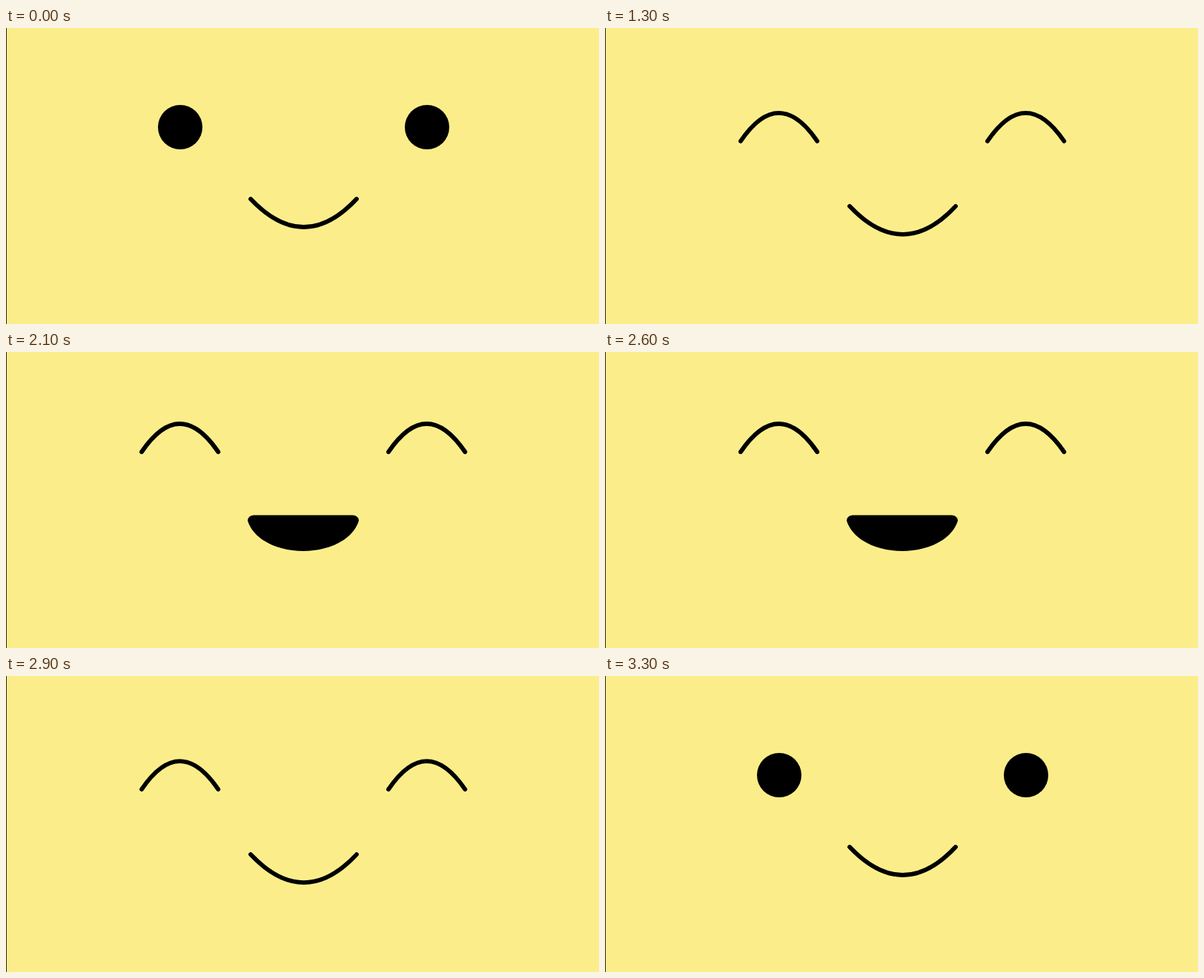
An HTML page that plays this animation: 800 by 400 pixels, repeating every 3400 ms.

```html
<!DOCTYPE html>
<html lang="en">
<head>
<meta charset="utf-8">
<title>Smiley</title>
<style>
  html, body { margin: 0; height: 100%; overflow: hidden; background: #fbee8a; }
  svg { display: block; }
  .line { fill: none; stroke: #000; stroke-width: 5.8; stroke-linecap: round; }
</style>
</head>
<body>
<svg width="800" height="400" viewBox="0 0 800 400">
  <rect width="1" height="400" fill="#2a2817"/>
  <g id="dots">
    <circle id="dot" cx="235" cy="134" r="30"/>
    <use href="#dot" x="333"/>
  </g>
  <g id="face">
    <g id="arcs">
      <path id="arc" class="line" d="M183 143Q234.500 67 286.300 143"/>
      <use href="#arc" x="333"/>
    </g>
    <path id="smile" class="line" d="M330 231Q402 307 473 231"/>
    <path id="laugh" d="M334 228.500H468Q476 229.500 476 236C467 264 432 277 401 277S335 264 326 236Q326 229.500 334 228.500Z"/>
  </g>
</svg>
<script>
const LOOP = 3400, STEP = 100;
const DIP = 11, LIFT = 19;

const el = id => document.getElementById(id);
const show = (id, on) => el(id).setAttribute("visibility", on ? "visible" : "hidden");

// Smooth rise from 0 to 1 between two times
function ramp(t, from, to) {
  const p = Math.min(1, Math.max(0, (t - from) / (to - from)));
  return p * p * (3 - 2 * p);
}

// The face sinks, springs up to laugh, sinks again and returns to rest
function offsetAt(t) {
  const dip = ramp(t, 1100, 1350) - ramp(t, 3100, 3300);
  const lift = ramp(t, 1400, 1600) - ramp(t, 2700, 2930);
  return DIP * dip - LIFT * lift;
}

function draw(now) {
  const t = Math.floor(now % LOOP / STEP) * STEP;
  const awake = t < 1200 || t >= 3300;
  const laughing = t >= 1500 && t < 2800;
  show("dots", awake);
  show("arcs", !awake);
  show("smile", !laughing);
  show("laugh", laughing);
  el("face").setAttribute("transform", `translate(0 ${awake ? 0 : offsetAt(t)})`);
}

const start = performance.now();
function frame() {
  draw(performance.now() - start);
  requestAnimationFrame(frame);
}
frame();
</script>
</body>
</html>
```
